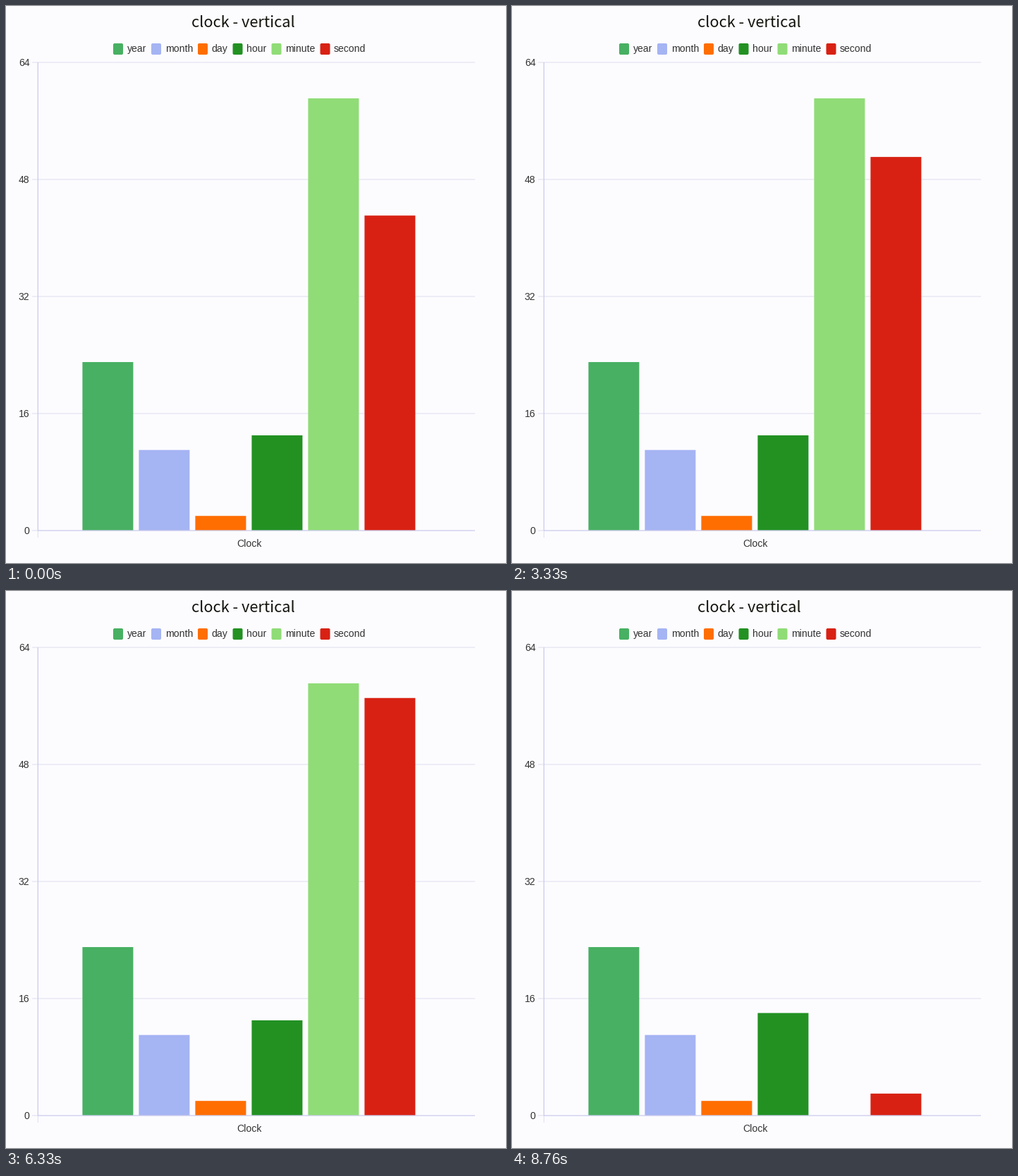
These frames come from a looping animation (709 px wide and 790 px high, 8.79 s). A matplotlib script:

```python
import matplotlib.pyplot as plt
from matplotlib.animation import FuncAnimation
from matplotlib.patches import FancyBboxPatch, Rectangle

W, H, DPI = 709, 790, 100
FRAMES, INTERVAL = 293, 30
TICK, FIRST_TICK = 15, 2           # frames per clock second, first change
BASE, UNIT = 744, 10.39            # zero line and pixels per unit
START = 13 * 3600 + 59 * 60 + 43   # 13:59:43

BG, INK, TITLE_INK = "#fcfcff", "#333333", "#12140c"
GRID, AXIS = "#dedeee", "#ccccec"
SERIES = [  # name, colour, legend x
    ("year", "#48b062", 152),
    ("month", "#a5b4f3", 206),
    ("day", "#ff6e00", 272),
    ("hour", "#229122", 321.5),
    ("minute", "#90dc77", 376.5),
    ("second", "#d82113", 445.5),
]

# The small margin keeps the pixel size from rounding down.
fig = plt.figure(figsize=((W + 0.01) / DPI, (H + 0.01) / DPI), dpi=DPI, facecolor=BG)
ax = fig.add_axes([0, 0, 1, 1])
ax.set_xlim(0, W)
ax.set_ylim(H, 0)
ax.axis("off")


def label(x, y, text, px=14, ha="left", color=INK, font="Liberation Sans"):
    ax.text(x, y, text, fontsize=px * 72 / DPI, family=font, color=color,
            ha=ha, va="baseline")


def line(xs, ys, color, width=1.0, z=1):
    ax.plot(xs, ys, color=color, lw=width * 72 / DPI, zorder=z,
            solid_capstyle="butt", snap=False)


label(336.5, 29.5, "clock - vertical", 21.8, "center", TITLE_INK, "Noto Sans CJK JP")
label(344.5, 766.5, "Clock", ha="center")

for value in range(0, 65, 16):
    y = BASE - value * 166 / 16
    label(33.5, y + 4.5, str(value), ha="right")
    if value:
        line([45, 665], [y, y], GRID)
    line([37, 45], [y, y], GRID)
line([45, 665], [BASE, BASE], AXIS, 1.3, 3)
line([45.3, 45.3], [80, BASE], AXIS, 1.3, 3)
line([45.3, 45.3], [BASE, 754], GRID)

bars = []
for i, (name, color, x) in enumerate(SERIES):
    ax.add_patch(FancyBboxPatch((x + 2, 55), 10, 12, boxstyle="round,pad=2,rounding_size=2",
                                fc=color, ec="none"))
    label(x + 19.6, 65.3, name)
    bar = Rectangle((108.4 + 80 * i, BASE), 72, 0, fc=color, ec="none", zorder=2, snap=False)
    bars.append(ax.add_patch(bar))
zero_mark = Rectangle((508.4, BASE - 1), 72, 1, fc="#dfa9b9", ec="none", zorder=4)
ax.add_patch(zero_mark)


def update(frame):
    clock = START + (frame - FIRST_TICK) // TICK + 1
    values = (23, 11, 2, clock // 3600, clock // 60 % 60, clock % 60)
    for bar, value in zip(bars, values):
        bar.set_y(BASE - value * UNIT)
        bar.set_height(value * UNIT)
    zero_mark.set_visible(values[-1] == 0)
    return bars + [zero_mark]


anim = FuncAnimation(fig, update, frames=FRAMES, interval=INTERVAL,
                     repeat=True, repeat_delay=0, blit=False)
plt.show()
```
